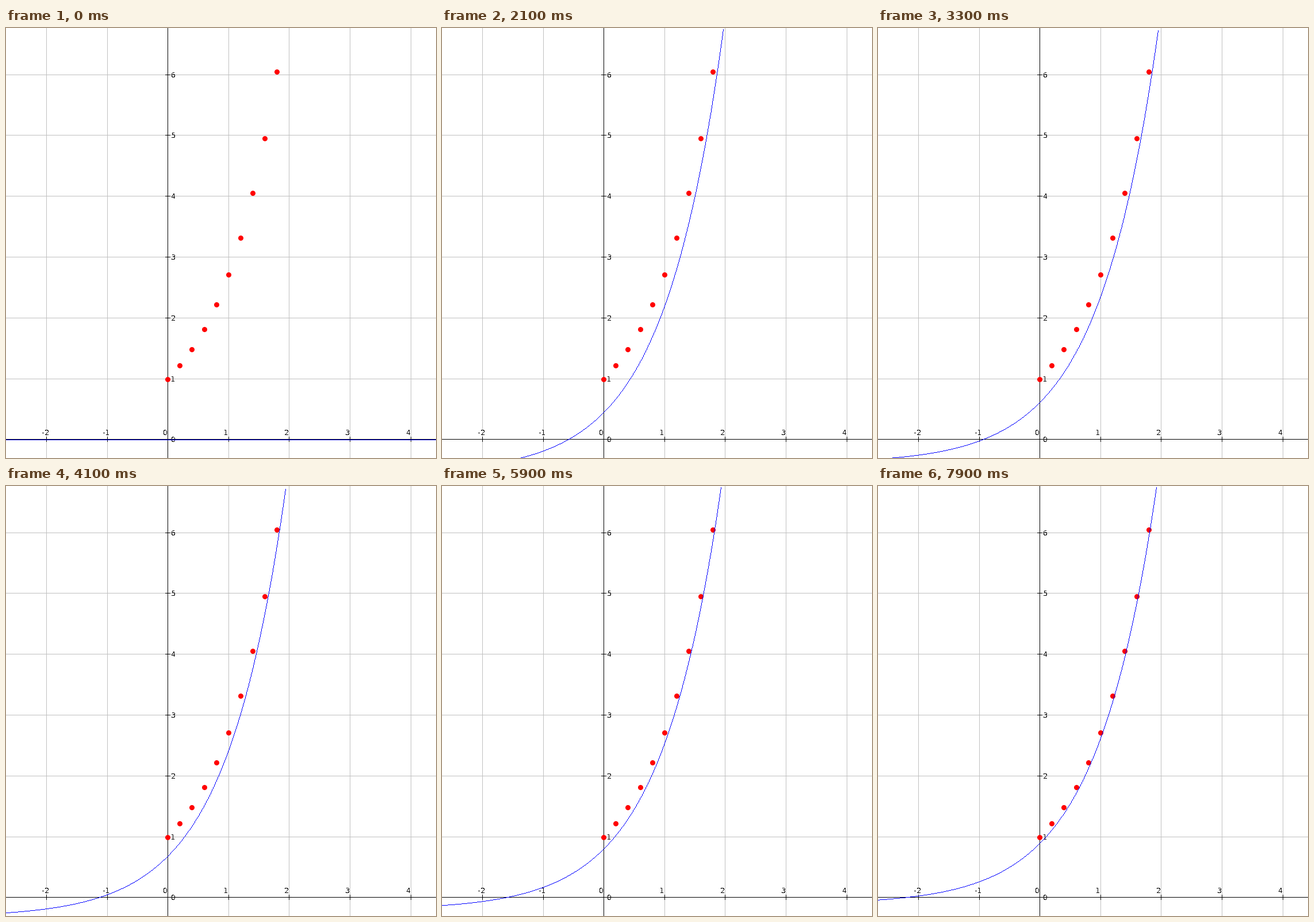
Write a matplotlib script that moves like this. It is 748 by 748 pixels and loops after 8000 ms.

```python
import math

import matplotlib.pyplot as plt
import numpy as np
from matplotlib.animation import FuncAnimation

SIZE = 748
DPI = 100
PX = 72 / DPI              # one pixel in points
FRAMES, INTERVAL = 80, 100
X0, Y0 = 281.15, 715.4     # position of the origin on the stage
SX, SY = 105.6, 105.8      # pixels per unit

START = 5                  # first fitted curve appears
FIRST_STEP = 9             # fitting starts moving
PAUSES = {10, 13, 28, 35, 39, 43, 47, 53, 58, 63, 70, 76}

plt.rcParams["font.family"] = "DejaVu Sans"
plt.rcParams["text.hinting"] = "force_autohint"
plt.rcParams["text.hinting_factor"] = 1

fig = plt.figure(figsize=(SIZE / DPI, SIZE / DPI), dpi=DPI, facecolor="white")
ax = fig.add_axes([0, 0, 1, 1])
ax.set_xlim(0, SIZE)
ax.set_ylim(SIZE, 0)
ax.axis("off")


def col(x):
    """Centre of the pixel column at x."""
    return round(X0 + SX * x) + 0.5


def row(y):
    """Centre of the pixel row at y."""
    return round(Y0 - SY * y) + 0.5


def line(xs, ys, color, z):
    ax.plot(xs, ys, color=color, lw=PX, snap=False,
            solid_capstyle="butt", zorder=z)


def label(x, y, value):
    ax.text(x, y, str(value), size=12 * PX, color="black", ha="left",
            va="baseline", antialiased=False, zorder=3)


def draw_grid():
    for k in range(-2, 5):
        line([col(k)] * 2, [0, SIZE], "#c0c0c0", 1)
    for k in range(7):
        line([0, SIZE], [row(k)] * 2, "#c0c0c0", 1)


def draw_axes():
    cx, cy = col(0), row(0)
    line([cx, cx], [0, SIZE], "black", 2)
    line([0, SIZE], [cy, cy], "black", 2)
    for k in range(-2, 5):
        line([col(k)] * 2, [cy - 4.5, cy + 4.5], "black", 2)
        label(col(k) - 8.5, 708, k)
    for k in range(7):
        line([cx - 4.5, cx + 4.5], [row(k)] * 2, "black", 2)
        label(cx + 5.5, row(k) + 4.5, k)


def draw_samples():
    xs = np.arange(10) * 0.2
    ax.plot([col(x) for x in xs], [row(math.exp(x)) for x in xs], "o",
            color="red", ms=9 * PX, mew=0, snap=False, zorder=4)


draw_grid()
draw_axes()
draw_samples()
columns = np.arange(SIZE)
layer = np.zeros((SIZE, SIZE, 4), dtype=np.uint8)
curve = fig.figimage(layer, 0, 0, origin="upper", zorder=5)


def fitted(x, step):
    """Exponential whose offset shrinks towards zero with every step."""
    offset = math.exp(-0.25 - 0.0303 * step - 0.00005 * step ** 2)
    return np.exp((1 + 0.0175 * offset) * x) - offset


def rasterise(xs, ys):
    """Hard one-pixel line through rising points, one per column."""
    rows = np.arange(ys.min(), ys.max() + 1)
    crossings = np.rint(np.interp(rows, ys[::-1], xs[::-1])).astype(int)
    pixels = np.zeros_like(layer)
    pixels[ys, xs] = pixels[rows, crossings] = (0, 0, 255, 255)
    return pixels


def update(frame):
    if frame < START:
        ys = np.full(SIZE, round(Y0) + 1)
    else:
        step = sum(i not in PAUSES for i in range(FIRST_STEP, frame + 1))
        ys = np.rint(Y0 - SY * fitted((columns - X0) / SX, step)).astype(int)
    seen = (ys >= 0) & (ys < SIZE)
    curve.set_data(rasterise(columns[seen], ys[seen]))
    return [curve]


anim = FuncAnimation(fig, update, frames=FRAMES, interval=INTERVAL,
                     repeat=True, repeat_delay=0, blit=False)
plt.show()
```
